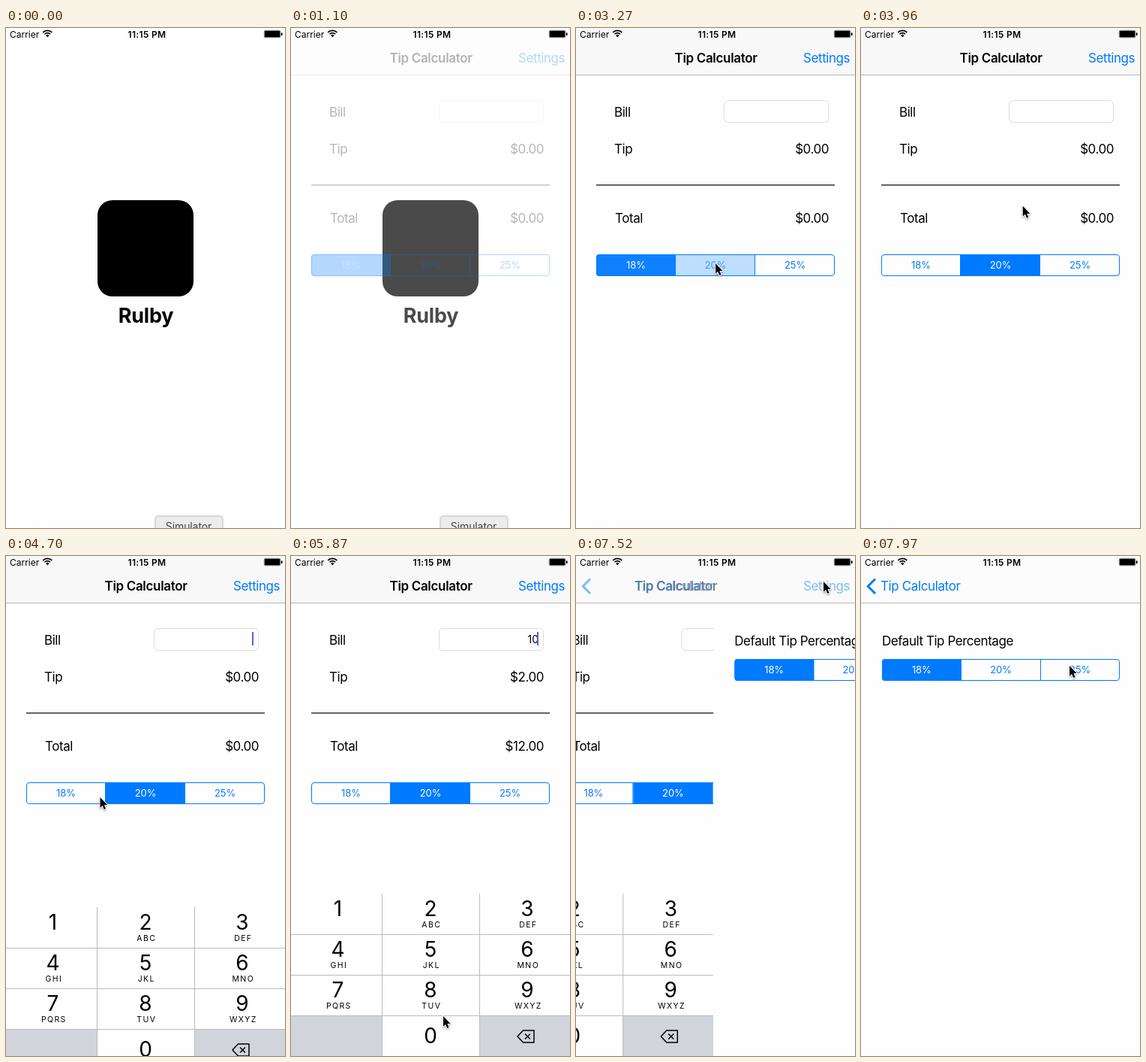
An HTML page with a canvas for the animation above (8 s loop, 372 px wide and 665 px high).

```html
<!DOCTYPE html>
<html lang="en">
<head>
<meta charset="utf-8">
<title>Tip calculator</title>
<style>
html, body { margin: 0; width: 100%; height: 100%; overflow: hidden; background: #fefefe; }
canvas { display: block; width: 372px; height: 665px; }
</style>
</head>
<body>
<canvas id="stage" width="372" height="665"></canvas>
<script>
const W = 372, H = 665, LOOP = 8000;
const BLUE = '#007aff', PAGE = '#fefefe', GREY = '#d1d4db';
const ctx = document.getElementById('stage').getContext('2d');

const clamp = v => Math.max(0, Math.min(1, v));
const ramp = (t, a, b) => clamp((t - a) / (b - a));
const mix = (a, b, p) => a + (b - a) * p;
const ease = {
  io: p => p * p * (3 - 2 * p),
  in: p => p * p,
  out: p => 1 - (1 - p) * (1 - p)
};

// Critically damped spring from 1 to 0, at rest once it is too small to see.
function spring(ms) {
  const k = Math.max(0, ms) * 0.0187;
  return k > 9 ? 0 : (1 + k) * Math.exp(-k);
}

function text(str, x, y, { size = 17, weight = 400, color = '#000', align = 'left', gap = -0.45 } = {}) {
  ctx.font = `${weight} ${size}px Inter, "Liberation Sans", sans-serif`;
  ctx.letterSpacing = gap + 'px';
  ctx.textAlign = align;
  ctx.fillStyle = color;
  ctx.fillText(str, x, y);
}

function rect(x, y, w, h, color) {
  ctx.fillStyle = color;
  ctx.fillRect(x, y, w, h);
}

function round(x, y, w, h, r) {
  ctx.beginPath();
  ctx.roundRect(x, y, w, h, r);
}

function poly(points, close) {
  ctx.beginPath();
  points.forEach(([x, y]) => ctx.lineTo(x, y));
  if (close) ctx.closePath();
}

function stroke(color, width) {
  ctx.strokeStyle = color;
  ctx.lineWidth = width;
  ctx.stroke();
}

// Draws with a relative opacity and offset.
function layer(alpha, dx, draw) {
  if (alpha <= 0) return;
  ctx.save();
  ctx.globalAlpha *= alpha;
  ctx.translate(dx, 0);
  draw();
  ctx.restore();
}

function statusBar() {
  text('Carrier', 5, 12.5, { size: 12, gap: 0 });
  text('11:15 PM', 188, 12.5, { size: 12, weight: 600, align: 'center', gap: 0.33 });
  for (const r of [8.6, 5.4]) {
    ctx.beginPath();
    ctx.arc(55.3, 12, r, -Math.PI * 0.75, -Math.PI * 0.25);
    stroke('#000', 1.7);
  }
  ctx.beginPath();
  ctx.moveTo(55.3, 12.3);
  ctx.arc(55.3, 12, 3, -Math.PI * 0.75, -Math.PI * 0.25);
  ctx.fillStyle = '#000';
  ctx.fill();
  round(344.3, 3.3, 21.6, 9.4, 1.8);
  stroke('#000', 0.6);
  round(345, 4, 20.2, 8, 1);
  ctx.fill();
  round(366.8, 6.2, 1.8, 3.8, 0.8);
  ctx.fill();
}

function splash() {
  rect(0, 0, W, H, PAGE);
  round(122, 229, 128, 128, 20);
  ctx.fillStyle = '#000';
  ctx.fill();
  text('Rulby', 186.5, 392, { size: 27, weight: 700, align: 'center', gap: -0.2 });
}

// fills: how far each of the three segments is selected, 0 to 1
function segments(x, y, w, fills) {
  const h = 29, step = w / 3;
  const edge = i => x + Math.ceil(i * step);
  ctx.save();
  round(x, y, w, h, 4);
  ctx.clip();
  fills.forEach((f, i) => rect(edge(i), y, edge(i + 1) - edge(i), h, `rgba(0,122,255,${f})`));
  ctx.restore();
  round(x + 0.5, y + 0.5, w - 1, h - 1, 3.5);
  stroke(BLUE, 1);
  for (const i of [1, 2]) rect(edge(i) - 1, y, 1, h, BLUE);
  ['18%', '20%', '25%'].forEach((label, i) => {
    const f = fills[i];
    const color = `rgb(${mix(0, 255, f)},${mix(122, 255, f)},255)`;
    text(label, x + (i + 0.5) * step, y + 19, { size: 13, align: 'center', gap: -0.1, color });
  });
}

const KEYS = ['1', '2 ABC', '3 DEF', '4 GHI', '5 JKL', '6 MNO', '7 PQRS', '8 TUV', '9 WXYZ'];
const COLS = [[0, 121, 62.5], [122, 129, 186], [252, 120, 315]];

function keyboard(top, pressed) {
  rect(0, top, W, 216, PAGE);
  KEYS.forEach((key, i) => {
    const [num, abc] = key.split(' ');
    const [x, w, mid] = COLS[i % 3];
    const y = top + 54 * Math.floor(i / 3);
    if (pressed === num) rect(x, y, w, 54, GREY);
    text(num, mid, y + 30, { size: 28, align: 'center', gap: 0 });
    if (abc) text(abc, mid + 1.3, y + 45, { size: 10.5, align: 'center', gap: 1.4 });
  });
  const y = top + 162;
  rect(0, y, W, 54, GREY);
  rect(122, y, 129, 54, pressed === '0' ? GREY : PAGE);
  text('0', 186, y + 37, { size: 28, align: 'center', gap: 0 });
  for (const r of [54, 108, 162]) rect(0, top + r, W, 1, '#b9bbc0');
  for (const x of [121, 251]) rect(x, top, 1, 216, '#b9bbc0');

  ctx.lineJoin = 'round';
  poly([[302, y + 28], [309.5, y + 20], [324, y + 20], [324, y + 36], [309.5, y + 36]], true);
  stroke('#000', 1.5);
  poly([[312, y + 24.5], [319, y + 31.5]]);
  stroke('#000', 1.5);
  poly([[319, y + 24.5], [312, y + 31.5]]);
  stroke('#000', 1.5);
}

const TYPED = [[5400, '1'], [5800, '10'], [6000, '100']];
const PRESSES = [[5310, 5430, '1'], [5720, 5830, '0'], [5920, 6040, '0']];
const FOCUS = 4480, PUSH = 7430;

function calculator(t) {
  rect(0, 63, W, H - 63, PAGE);
  const typed = TYPED.filter(([at]) => t >= at).pop() || [FOCUS, ''];
  const bill = Number(typed[1]);
  const right = { align: 'right' };

  text('Bill', 51, 118);
  text('Tip', 51, 167);
  text('Total', 52, 259);
  round(197.5, 96.5, 139, 29, 5);
  stroke('#dddddf', 1);
  text(typed[1], 330, 116, { size: 14, align: 'right', gap: 0 });
  if (t >= FOCUS && (t - typed[0]) % 1000 < 530) rect(328, 101, 2, 18, '#4a66e4');
  text('$' + (bill * 0.2).toFixed(2), 337, 167, right);
  text('$' + (bill * 1.2).toFixed(2), 337, 259, right);
  rect(27, 208, 318, 1.7, '#4c4c4c');

  const touch = 0.2 * ramp(t, 2960, 3080);
  const pick = ramp(t, 3250, 3610);
  segments(27, 301, 318, [1 - pick, mix(touch, 1, pick), 0]);
}

function settings() {
  rect(0, 63, W, H - 63, PAGE);
  text('Default Tip Percentage', 28, 119);
  segments(28, 137, 317, [1, 0, 0]);
}

function navBar(t, push) {
  const tone = mix(248, 252, push);
  rect(0, 0, W, 62, `rgb(${tone},${tone},${tone})`);
  rect(0, 62, W, 1, '#b9b9bb');
  const x = mix(131.5, 26, push);
  const dim = t < 7060 ? 1 : mix(0.25, 1, ramp(t, 7100, 7250));
  layer(1 - push, 0, () => text('Tip Calculator', x, 46, { weight: 600, gap: -0.33 }));
  layer((1 - push) * dim, 0, () => text('Settings', 365, 46, { align: 'right', color: BLUE }));
  layer(push, 0, () => {
    text('Tip Calculator', x, 46, { color: BLUE, gap: -0.38 });
    ctx.lineJoin = 'miter';
    poly([[19, 30.5], [9.3, 40.3], [19, 50]]);
    stroke(BLUE, 3);
  });
}

function tooltip() {
  ctx.save();
  ctx.shadowColor = 'rgba(0,0,0,.3)';
  ctx.shadowBlur = 3;
  round(199, 649, 90, 30, 4);
  ctx.fillStyle = '#ececec';
  ctx.fill();
  ctx.restore();
  round(199.5, 649.5, 89, 30, 4);
  stroke('#cfcfcf', 1);
  text('Simulator', 243.5, 668, { size: 14, align: 'center', color: '#444', gap: -0.1 });
}

// time, x, y, easing towards this point
const PATH = [
  [2390, 248, 575], [2820, 186, 313, 'io'],
  [3870, 186, 313], [4090, 266, 108, 'io'],
  [4530, 266, 108], [4700, 126, 320, 'in'], [4960, 62, 466, 'out'],
  [5430, 62, 466], [5660, 203, 612, 'io'],
  [6160, 203, 612], [6370, 287, 284, 'io'],
  [6510, 287, 284], [6790, 313, 18, 'io'],
  [6850, 313, 18], [7000, 330, 34, 'io'],
  [7820, 330, 34], [7970, 278, 146, 'io']
];

function cursor(t) {
  if (t < PATH[0][0]) return;
  const next = PATH.findIndex(p => p[0] > t);
  const b = PATH[next < 0 ? PATH.length - 1 : next];
  const a = next < 0 ? b : PATH[next - 1];
  const p = a === b ? 1 : ease[b[3] || 'io'](ramp(t, a[0], b[0]));
  ctx.save();
  ctx.translate(mix(a[1], b[1], p), mix(a[2], b[2], p));
  ctx.lineJoin = 'round';
  poly([[0, 0], [0, 13.8], [3.1, 11], [5.3, 16], [7.6, 15], [5.4, 10.1], [9.6, 10]], true);
  ctx.shadowColor = 'rgba(0,0,0,.4)';
  ctx.shadowBlur = 2.5;
  ctx.shadowOffsetY = 1;
  stroke('#fff', 2);
  ctx.shadowColor = 'transparent';
  ctx.fillStyle = '#000';
  ctx.fill();
  ctx.restore();
}

function draw(t) {
  const push = 1 - spring(t - PUSH);
  splash();
  layer(ramp(t, 1040, 1250), 0, () => {
    if (push < 1) {
      layer(1, -0.3 * W * push, () => calculator(t));
      if (t > FOCUS) {
        const key = PRESSES.find(([a, b]) => t >= a && t < b);
        const top = 449 + Math.round(216 * spring(t - FOCUS));
        layer(1, -W * push, () => keyboard(top, key && key[2]));
      }
    }
    if (push > 0) layer(1, W * (1 - push), settings);
    navBar(t, push);
  });
  statusBar();
  if (t < 2510) tooltip();
  cursor(t);
}

const start = performance.now();
function tick() {
  draw((performance.now() - start) % LOOP);
  requestAnimationFrame(tick);
}
tick();
</script>
</body>
</html>
```
